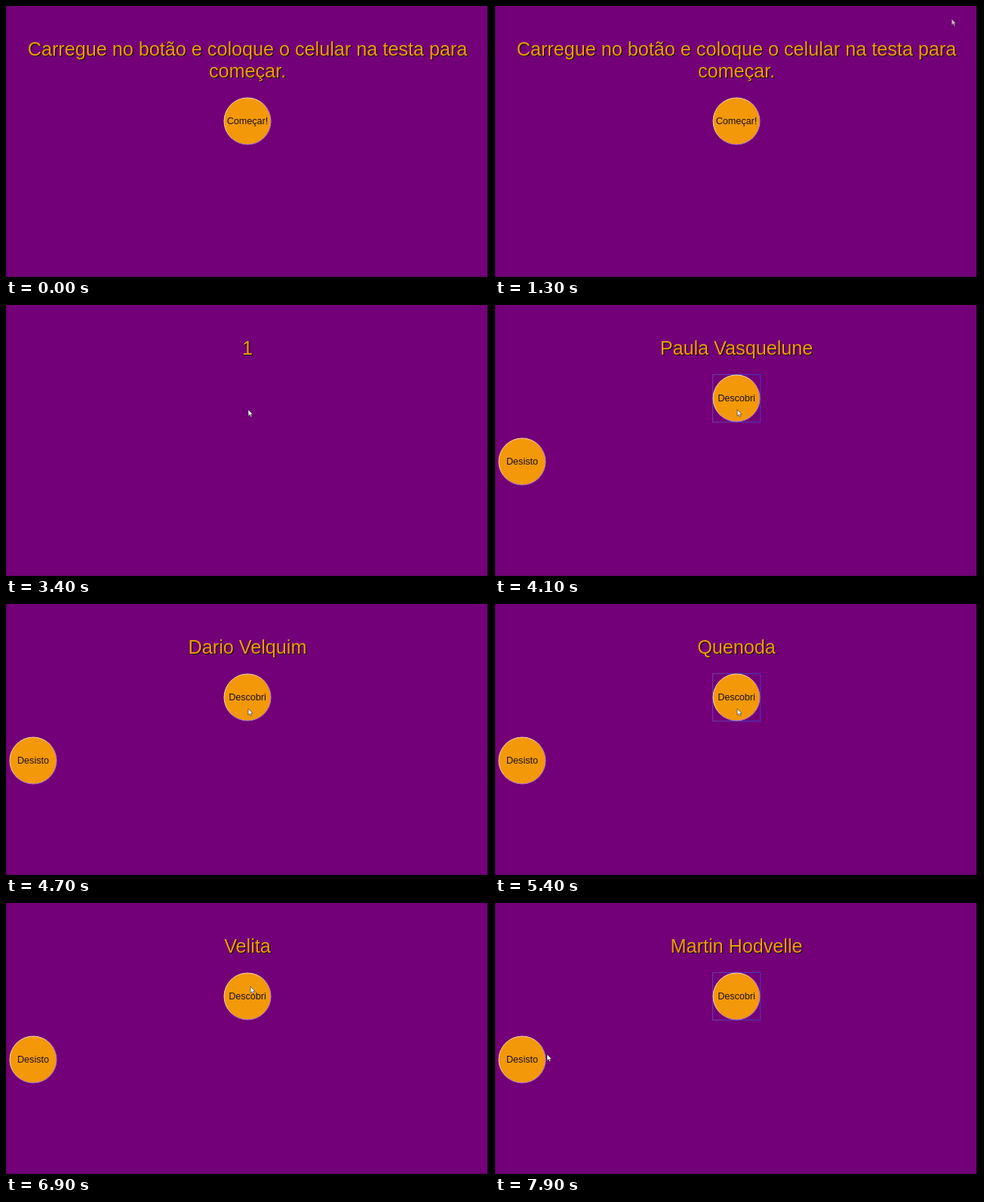
Animation, 640 px wide and 360 px high, one loop 8 s. Source, as an HTML page:

```html
<!DOCTYPE html>
<html lang="pt">
<head>
<meta charset="utf-8">
<style>
html, body { margin: 0; width: 100%; height: 100%; overflow: hidden; background: #730078; }
svg { display: block; width: 640px; height: 360px; }
text { font-family: "Liberation Sans", Arial, sans-serif; text-anchor: middle; }
.title { font-size: 25.2px; fill: #f39a0c; text-shadow: 1px 1px 1px #000; }
.button text { font-size: 12.6px; fill: #1a1020; }
.button circle { fill: #f39808; stroke: url(#bevel); }
#ring { fill: none; stroke: url(#focus); }
</style>
</head>
<body>
<svg viewBox="0 0 640 360">
  <defs>
    <linearGradient id="bevel" x2="1" y2="1">
      <stop offset=".4" stop-color="#f8d8b0"/>
      <stop offset=".6" stop-color="#ac78d0"/>
    </linearGradient>
    <linearGradient id="focus">
      <stop stop-color="#6c3cac"/>
      <stop offset="1" stop-color="#4038c4"/>
    </linearGradient>
  </defs>
  <path d="M.5 0V359.5H640" fill="none" stroke="#5c0062"/>
  <path d="M639 0V360" stroke="#000" stroke-width="2"/>
  <text class="title" id="line1" x="320" y="66"></text>
  <text class="title" id="line2" x="320" y="95">começar.</text>
  <g class="button" id="main">
    <rect id="ring" x="-31.5" y="-31.5" width="63" height="63"/>
    <circle r="31"/>
    <text id="label" y="4"></text>
  </g>
  <g class="button" id="quit" transform="translate(36 208)">
    <circle r="31"/>
    <text y="4">Desisto</text>
  </g>
  <path id="cursor" d="M0 0V8.4L2 6.7 3.4 9.8 4.8 9.2 3.5 6.2H6Z" fill="#fff" stroke="#302030" stroke-width=".6"/>
</svg>
<script>
const LOOP = 8000, STEP = 100, BEAT = 319, COUNTDOWN = 2900, GAME = 3700;
const INTRO = "Carregue no botão e coloque o celular na testa para";

// One page per beat; an empty entry keeps the page before it
const pages = [
  "3", "2", "1",
  "Tilda Moruza", "Paula Vasquelune", "Lívia Zorel", "Dario Velquim",
  "Nestor Blini", "Quenoda", "Heloísa Prunk", "Otávio Brende",
  "Jonas Tibrel", "", "Velita", "Marlon Quibes", "", "Martin Hodvelle"
];

// Pointer glides: start, end, x, y
const glides = [
  [1400, 2000, 288, 53], [2200, 2500, 321, 139],
  [6600, 6700, 324, 111], [7100, 7500, 69, 201]
];

const $ = id => document.getElementById(id);
const show = (id, on) => $(id).style.display = on ? "" : "none";
const place = (id, x, y) => $(id).setAttribute("transform", `translate(${x} ${y})`);
const ease = p => p * p * (3 - 2 * p);
const pageStart = i => Math.round((GAME + (i - 3) * BEAT) / STEP) * STEP;

function pointer(t) {
  let x = 605, y = 17;
  for (const [from, to, toX, toY] of glides) {
    const p = ease(Math.min(1, Math.max(0, (t - from) / (to - from))));
    x += (toX - x) * p;
    y += (toY - y) * p;
  }
  return [x, y];
}

function draw(now) {
  const t = Math.floor(now % LOOP / STEP) * STEP;
  const intro = t < COUNTDOWN, game = t >= GAME;
  const page = pages.findLastIndex((name, i) => name && pageStart(i) <= t);

  $("line1").textContent = intro ? INTRO : pages[page];
  $("label").textContent = intro ? "Começar!" : "Descobri";
  show("line2", intro);
  show("main", intro || game);
  show("quit", game);
  // The button is focused just before the countdown and one step after each new page
  show("ring", intro ? t >= COUNTDOWN - STEP : t > pageStart(page));
  place("main", 320, intro ? 153 : 124);
  show("cursor", t >= 1300);
  place("cursor", ...pointer(t));
  $("cursor").style.opacity = intro ? .7 : 1;
}

const start = performance.now();
function tick() {
  draw(performance.now() - start);
  requestAnimationFrame(tick);
}
tick();
</script>
</body>
</html>
```
